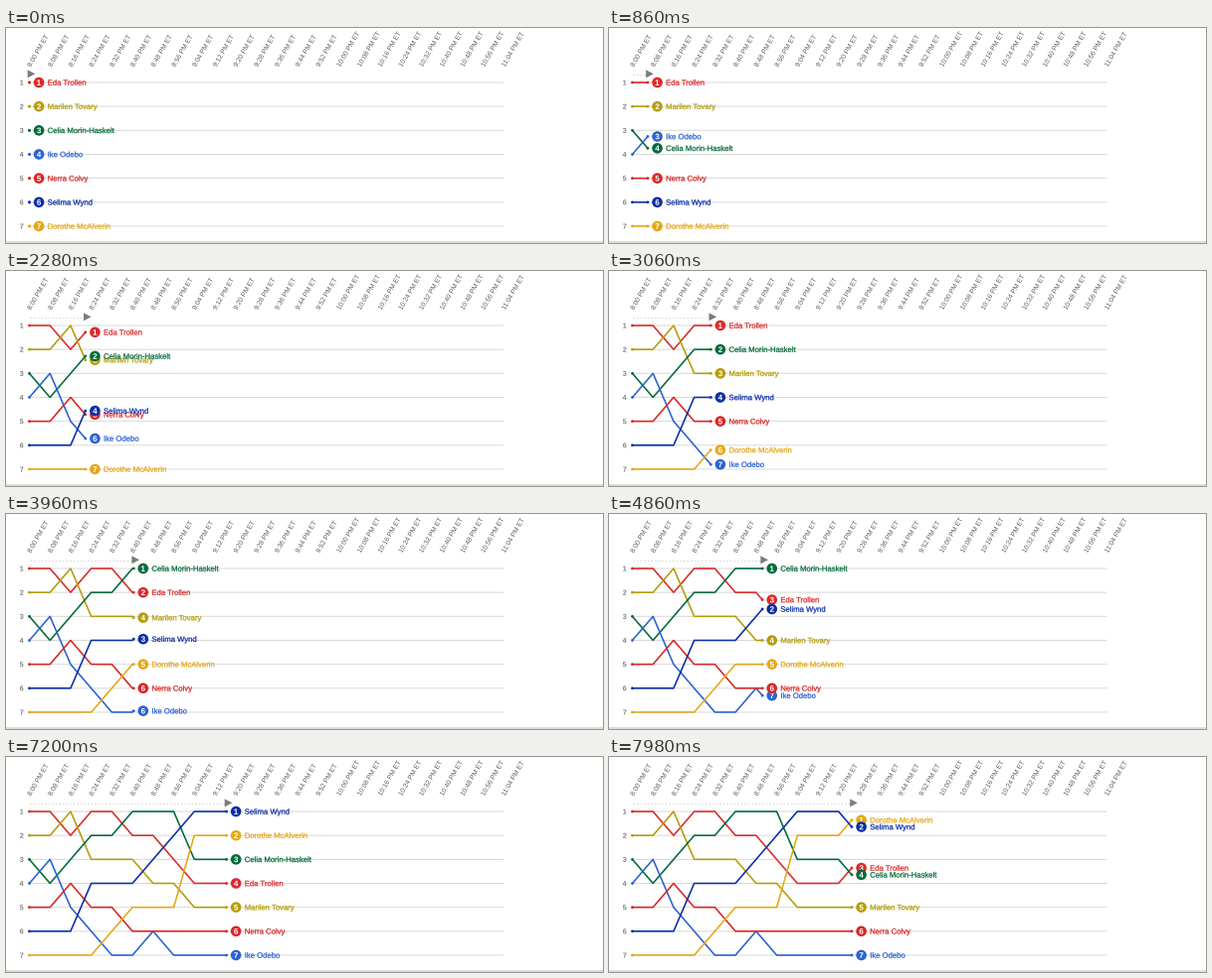
Write a matplotlib script that moves like this. It is 600 px wide and 217 px high and loops after 8 s.

```python
import math
import matplotlib.pyplot as plt
from matplotlib.animation import FuncAnimation
from matplotlib.patches import Circle, PathPatch, Polygon
from matplotlib.path import Path
from matplotlib.textpath import TextPath
from matplotlib.transforms import Affine2D

W, H, DPI = 600, 217, 100
FRAMES, INTERVAL = 400, 20
PX = 72 / DPI
X0, DX = 23.5, 20.72
Y0, DY = 55, 24.17
SPEED, RAMP = 1.39, 0.648   # steps per second, seconds of acceleration

# name, colour, rank at each time step
RACERS = [
    ("Eda Trollen", "#dc2a2a", "112112234443"),
    ("Marilen Tovary", "#b59d0a", "221333445555"),
    ("Celia Morin-Haskelt", "#026b3a", "343221113334"),
    ("Ike Odebo", "#2a62d2", "435677677777"),
    ("Nerra Colvy", "#d92626", "554556666666"),
    ("Dorothe McAlverin", "#e6a817", "777765552221"),
    ("Selima Wynd", "#0c2ea6", "666444321112"),
]


def glyphs(text, size, align="left", weight="normal", angle=0):
    """Text outline in y-down pixels, vertically centred on its capitals."""
    prop = {"family": "Liberation Sans", "weight": weight}
    path = TextPath((0, 0), text, size=size, prop=prop)
    box = path.get_extents()
    shift = {"left": 0, "center": -(box.x0 + box.x1) / 2, "right": -box.x1}[align]
    move = Affine2D().translate(shift, -0.35 * size).scale(1, -1).rotate_deg(-angle)
    return move.transform_path(path)


def place(path, x, y):
    return Affine2D().translate(x, y).transform_path(path)


def step_x(i):
    return X0 + DX * i


def rank_y(rank):
    return Y0 + DY * (rank - 1)


def progress(t):
    if t < RAMP:
        return SPEED * t * t / (2 * RAMP)
    return SPEED * (t - RAMP / 2)


fig = plt.figure(figsize=(W / DPI, H / DPI), dpi=DPI, facecolor="white")
ax = fig.add_axes([0, 0, 1, 1])
ax.set_xlim(0, W)
ax.set_ylim(H, 0)
ax.axis("off")


def rule(x0, x1, y, color):
    ax.plot([x0, x1], [y, y], color=color, lw=PX, snap=False, zorder=1)


# Static scale: rank rows, time labels, bottom rule
for r in range(1, 8):
    rule(X0, 500, rank_y(r), "#d9d9d9")
rule(0, W, 216, "#bfbfbf")

ranks = [place(glyphs(str(r), 7.2, "right", "bold"), 17.5, rank_y(r))
         for r in range(1, 8)]
times = []
for i in range(24):
    hour, minute = divmod(8 * 60 + 8 * i, 60)
    label = glyphs(f"{hour}:{minute:02d} PM ET", 6.8, angle=60)
    times.append(place(label, step_x(i) - 0.7, 38.5))
for paths, color in ((ranks, "#808080"), (times, "#5e5e5e")):
    ax.add_patch(PathPatch(Path.make_compound_path(*paths), fc=color, ec="none",
                           zorder=1))

trail, = ax.plot([], [], color="#d6d6d6", lw=0.9 * PX, ls=(0, (2, 2)), zorder=1)
arrow = ax.add_patch(Polygon([(0, 0)] * 3, fc="#7b7b7b", ec="none", zorder=2))
digits = {d: glyphs(str(d), 8, "center", "bold") for d in range(1, 8)}


class Racer:
    def __init__(self, name, color, ranks, z):
        self.ranks = [int(c) for c in ranks]
        self.line, = ax.plot([], [], color=color, lw=1.6 * PX, zorder=3,
                             snap=False, solid_joinstyle="round")
        start = (X0, rank_y(self.ranks[0]))
        ax.add_patch(Circle(start, 1.4, fc=color, ec="none", zorder=3))
        self.tip = ax.add_patch(Circle(start, 1.4, fc=color, ec="none", zorder=3))
        self.disc = ax.add_patch(Circle(start, 5.3, fc=color, ec="none", zorder=z))
        self.digit = ax.add_patch(PathPatch(digits[1], fc="white", ec="none",
                                            zorder=z + 0.1))
        self.text = glyphs(name, 7.7)
        self.label = ax.add_patch(PathPatch(self.text, fc=color, ec=color,
                                            lw=0.25 * PX, zorder=z + 0.2))

    def update(self, u):
        i = min(int(u), len(self.ranks) - 2)
        a, b = self.ranks[i], self.ranks[i + 1]
        x, y = step_x(u), rank_y(a + (b - a) * (u - i))
        self.line.set_data([step_x(k) for k in range(i + 1)] + [x],
                           [rank_y(r) for r in self.ranks[:i + 1]] + [y])
        self.tip.center = (x, y)
        self.disc.center = (x + 9.6, y)
        rank = self.ranks[math.ceil(u)]
        self.digit.set_path(place(digits[rank], x + 9.6, y))
        self.label.set_path(place(self.text, x + 18.2, y))


racers = [Racer(*row, z=4 + k) for k, row in enumerate(RACERS)]


def update(n):
    u = progress(n * INTERVAL / 1000)
    x = step_x(u)
    trail.set_data([X0, x - 1.5], [46.5, 46.5])
    arrow.set_xy([(x - 1.8, 42.3), (x + 5.8, 46.3), (x - 1.8, 50.3)])
    for racer in racers:
        racer.update(u)
    return []


anim = FuncAnimation(fig, update, frames=FRAMES, interval=INTERVAL,
                     repeat=True, repeat_delay=0, blit=False)
plt.show()
```
